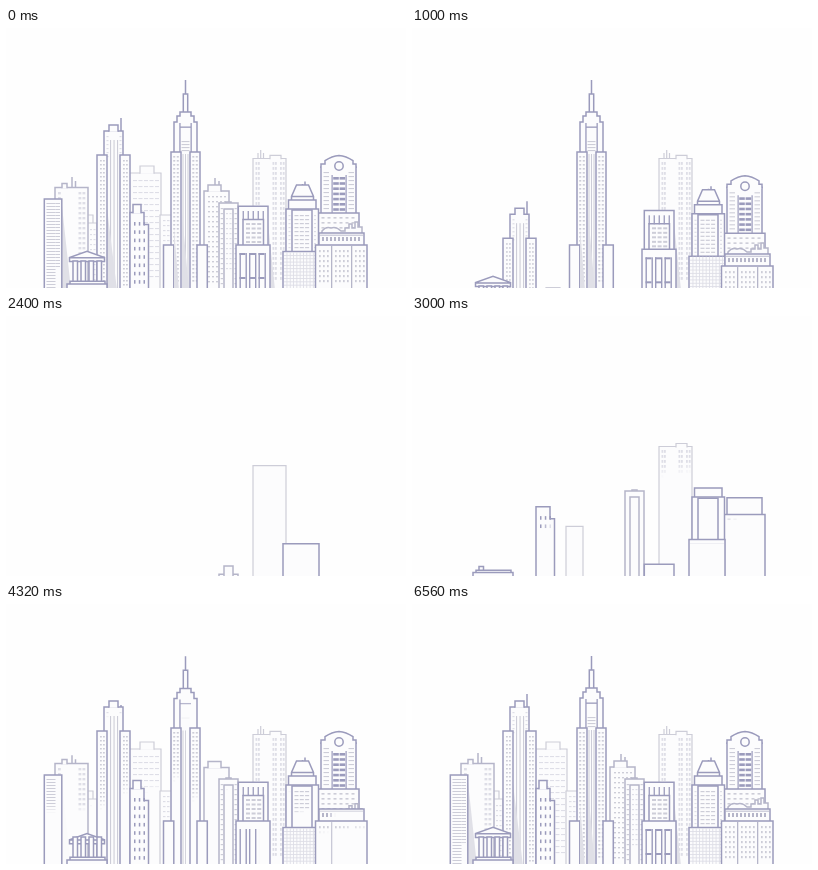
An HTML page with a canvas that plays this animation: 400 by 260 pixels, repeating every 9.12 s.

```html
<!DOCTYPE html>
<html lang="en">
<head>
<meta charset="utf-8">
<title>Skyline</title>
<style>
  html, body { margin: 0; width: 100%; height: 100%; overflow: hidden; background: #fefefe; }
  canvas { display: block; width: 400px; height: 260px; }
</style>
</head>
<body>
<canvas id="stage"></canvas>
<script>
const LOOP = 9120, GROUND = 260, MOVE = 600, REBUILD = 1660;
const INK = '#9b9bbc', MID = '#b5b5c9', PALE = '#cdcdd8', FAINT = '#dedee7', PAPER = '#fcfcfd';

const canvas = document.getElementById('stage');
const ctx = canvas.getContext('2d');
const ratio = window.devicePixelRatio || 1;
canvas.width = 400 * ratio;
canvas.height = 260 * ratio;

const clamp = v => Math.max(0, Math.min(1, v));
const easeIn = p => p ** 3;
const easeOut = p => 1 - (1 - p) ** 3;
const range = (start, end, step) =>
  Array.from({ length: Math.floor((end - start) / step + 1.001) }, (_, i) => start + i * step);

// Vertical offset of the latest solid; details on it share the offset.
let rise = 0;

function solid(at, ink, path, top, travel = GROUND + 2 - top) {
  const shape = new Path2D(path);
  return t => {
    rise = (1 - easeOut(clamp((t - at) / MOVE))) * travel;
    if (t < at) return;
    ctx.save();
    ctx.translate(0, rise);
    ctx.fillStyle = PAPER;
    ctx.fill(shape);
    ctx.strokeStyle = ink;
    ctx.lineWidth = ink === PALE ? 1.2 : 1.5;
    ctx.stroke(shape);
    ctx.restore();
  };
}

const box = (at, ink, x, y, w, travel) =>
  solid(at, ink, `M${x} 400V${y}H${x + w}V400`, y, travel);

// Roof step that opens into the wall below it.
const cap = (at, ink, x, y, w, roof, travel) =>
  solid(at, ink, `M${x} ${roof + 0.8}V${y}H${x + w}V${roof + 0.8}`, y, travel);

// Windows and lines that show up one after another, row by row.
function marks(from, to, ink, xs, ys, w, h) {
  const count = xs.length * ys.length;
  return t => {
    ctx.fillStyle = ink;
    ys.forEach((y, row) => xs.forEach((x, col) => {
      const at = from + (to - from) * (row * xs.length + col) / count;
      ctx.globalAlpha = clamp((t - at) / 100);
      if (t > at) ctx.fillRect(x, y + rise, w, h);
    }));
    ctx.globalAlpha = 1;
  };
}

function shade(at, x, y, w) {
  const shape = new Path2D(`M${x} ${y}L${x + w} 262H${x}Z`);
  return t => {
    ctx.globalAlpha = clamp((t - at) / 300);
    ctx.fillStyle = '#e0e0e7';
    ctx.fill(shape);
    ctx.globalAlpha = 1;
  };
}

const building = (out, top, ...parts) => ({ out, top, parts });

// Back to front.
const city = [
  building(405, 138,
    box(3420, PALE, 117, 145, 38),
    marks(3950, 4900, FAINT, range(127, 149, 5.5), range(152, 252, 6), 4, 1.1),
    cap(3798, PALE, 134, 138, 14, 145, 8)),

  building(250, 187,
    box(3716, PALE, 80, 187, 7),
    box(3740, PALE, 80, 195, 11),
    marks(4300, 4900, FAINT, [84, 87.5], range(201, 251, 5), 2, 1.2)),

  building(300, 187,
    box(2808, PALE, 154, 187, 17),
    marks(3500, 4400, FAINT, [157, 161], range(192, 252, 5), 2.5, 1.2)),

  building(1040, 122,
    solid(3500, PALE, 'M252 132V125M254.7 132V122M257.5 132V125', 122, 10),
    box(2116, PALE, 247, 130.5, 33),
    marks(2780, 3800, FAINT, [249.5, 252, 266.5, 269, 274, 276.8], range(134, 249, 5), 1.8, 2.8),
    shade(4500, 262, 195, 7),
    cap(2620, PALE, 264, 127.3, 11, 130.5, 4)),

  building(350, 150,
    solid(4250, MID, 'M209 160V150M213 160V153', 150, 14),
    box(3823, MID, 198, 163, 25),
    marks(4350, 5300, PALE, range(202, 218, 4), range(168, 253, 5), 2, 1.4),
    cap(3823, MID, 202, 157, 13, 163, 99)),

  building(300, 174,
    box(2440, MID, 220, 174, 5),
    box(2392, MID, 213, 175, 19),
    marks(3150, 4300, PALE, [214.7, 228.5], range(180, 255, 5), 2.3, 1.2),
    box(2370, MID, 218, 181, 9),
    marks(4300, 6560, FAINT, [220, 223.5], range(185, 240, 5), 2, 1.2)),

  building(200, 149,
    solid(4050, MID, 'M66 162V149M69.5 162V153', 149, 14),
    box(3486, MID, 49, 159.5, 33),
    marks(3680, 4600, FAINT, [52, 72.5, 76.5], range(164, 224, 5), 2.8, 2.4),
    shade(4300, 56, 178, 9),
    cap(3486, MID, 56, 155.5, 5, 159.5, 103)),

  building(160, 171,
    box(3530, INK, 38.3, 171, 17.5),
    marks(3950, 4900, PALE, [40.5], range(175, 259, 3), 9, 1),
    marks(4900, 6560, PALE, [49.5], range(175, 240, 3), 4.5, 1)),

  building(530, 90,
    solid(4250, INK, 'M115 106V90', 90, 16),
    box(3545, INK, 98, 103, 19),
    marks(3650, 3800, PALE, [104, 107.5, 111], [112], 1.1, 150),
    marks(4200, 4700, FAINT, [100.5, 113.5], range(108, 128, 4), 2, 1.2),
    shade(4400, 101, 180, 10),
    cap(3545, INK, 103, 97, 9, 103, 159),
    box(3590, INK, 91, 127, 10),
    marks(3800, 4700, PALE, [94, 97], range(132, 256, 4), 1.8, 1.5),
    box(3693, INK, 114, 127, 10),
    marks(3900, 4800, PALE, [117, 120], range(132, 256, 4), 1.8, 1.5)),

  building(330, 176,
    solid(2658, INK, 'M124 400V184.5H138V196.5H142.5V400', 184),
    marks(2780, 3700, INK, [128, 132.8, 137.5], range(194, 253, 8.3), 1.5, 3.6),
    cap(3150, INK, 127, 176.5, 8, 184.5, 9)),

  building(1000, 52,
    solid(3783, INK, 'M179.5 68V52', 52),
    box(3783, INK, 177.3, 66, 4.4),
    solid(3804, INK, 'M168 400V94H171V88H174V84H185V88H188V94H191V400', 84),
    marks(4200, 4500, INK, [173.3, 184.5], [95], 1.3, 29),
    marks(4250, 4500, INK, [174], [98.5], 11, 1.3),
    marks(4300, 4800, PALE, [175.5], range(113, 122, 3), 8, 1.1),
    marks(4100, 4500, PALE, [176.5, 179, 181.5], [126], 1, 136),
    shade(4500, 176, 185, 7),
    box(3715, INK, 165, 124, 10),
    marks(3950, 4900, PALE, [167.2, 170.8], range(128, 254, 4), 2, 1.6),
    box(3655, INK, 184, 124, 10),
    marks(3750, 4800, PALE, [186.3, 189.8], range(128, 254, 4), 2, 1.6),
    box(3790, INK, 157.5, 217, 10.3),
    box(3655, INK, 191, 217, 10.3),
    shade(4500, 168, 200, 5)),

  building(778, 178,
    box(2966, INK, 232.3, 178.3, 29.7),
    solid(3080, INK, 'M237 191.5H257.5V221H237Z', 191),
    marks(3550, 4000, PALE, [240, 245.6, 251.2], range(195, 213, 4.5), 4, 2),
    marks(3600, 4100, INK, range(236.6, 257, 5), [183], 1.3, 9),
    box(3534, INK, 230, 217, 34),
    marks(3950, 4500, INK, [233.5, 239.5, 243, 249, 252.5, 258.5], [225], 1.4, 37),
    marks(4400, 4800, INK, [233.5, 243, 252.5], [225, 249], 6, 2)),

  building(682, 127,
    box(2823, INK, 315, 139, 35),
    solid(3200, INK, 'M315 140V136H319V132.7Q326 128 333 127.5Q340 128 347 132.7V136H350V140', 127, 12),
    solid(3220, INK, 'M337.2 138A4.2 4.2 0 1 1 328.8 138A4.2 4.2 0 1 1 337.2 138Z', 134, 14),
    marks(3300, 3700, INK, [325.5, 339.5], [147], 1.2, 38),
    marks(3350, 3800, INK, [327.2, 333.6], range(149, 181, 5.2), 5.6, 2.6),
    marks(3400, 4100, PALE, [317.5, 342.5], range(144, 182, 4), 5.5, 1.1)),

  building(616, 185,
    box(2736, INK, 312, 185, 41),
    marks(2950, 3800, PALE, range(315.5, 346, 6), range(189, 213, 5), 3, 1.6)),

  building(790, 154,
    solid(3650, INK, 'M296.5 160V156M299 160V153.5', 154, 8),
    solid(3100, INK, 'M285.5 175V168.5L290.5 157H302.5L307.5 168.5V175M285.5 168.5H307.5', 156, 20),
    box(2430, INK, 282.5, 172, 27.5),
    box(2440, INK, 280, 181, 32.5),
    box(2480, INK, 286, 182, 20),
    marks(3700, 4700, PALE, [288.5, 293.8, 299.1], range(187, 219, 4), 4, 1.2),
    marks(4300, 4800, FAINT, [282.5, 308], range(187, 219, 4), 2, 1.2),
    box(2090, INK, 277, 223.5, 36),
    marks(2950, 3750, FAINT, [278], range(227, 259, 3.3), 34, 0.9),
    marks(3000, 3800, FAINT, range(280.5, 311, 3.3), [224], 0.9, 38)),

  building(595, 194,
    solid(4150, MID, 'M316 207V203Q320 198 325 200Q330 198 335 203H339V200H343V196H346V200H349V194H352V199H356V207', 194, 16),
    box(3655, INK, 313, 205, 45),
    marks(4150, 4700, MID, range(316, 354, 4), [209], 2, 4),
    marks(4250, 4500, MID, [313], [206.7], 45, 0.9),
    box(3800, INK, 309.5, 217, 51.5),
    marks(4200, 4850, PALE, [313, 317, 321, 329, 333, 337, 341, 349, 353, 357], range(222, 254, 5), 1.7, 2.2),
    marks(4250, 4500, MID, [325, 345], [218], 1.3, 44)),

  building(483, 223,
    solid(4050, INK, 'M63.5 233.5V229.5L81 223.3L98.5 229.5V233.5ZM64 229.8H98', 223, 38),
    ...range(67, 91, 8).map((x, i) =>
      solid(2940 + i * 130, INK, `M${x} 255V233H${x + 4.5}V255`, 233, 24)),
    solid(2700, INK, 'M64 257V253.3H99V257', 253, 8),
    box(2680, INK, 61, 256, 40, 6))
];

function draw(now) {
  const t = now % LOOP;
  const falling = t < REBUILD;
  ctx.setTransform(ratio, 0, 0, ratio, 0, 0);
  ctx.fillStyle = '#fefefe';
  ctx.fillRect(0, 0, 400, 260);
  for (const { out, top, parts } of city) {
    const drop = falling ? easeIn(clamp((t - out) / MOVE)) * (GROUND + 2 - top) : 0;
    ctx.save();
    ctx.translate(0, drop);
    for (const paint of parts) paint(falling ? Infinity : t);
    ctx.restore();
  }
}

const began = performance.now();
function tick() {
  draw(performance.now() - began);
  requestAnimationFrame(tick);
}
tick();
</script>
</body>
</html>
```
